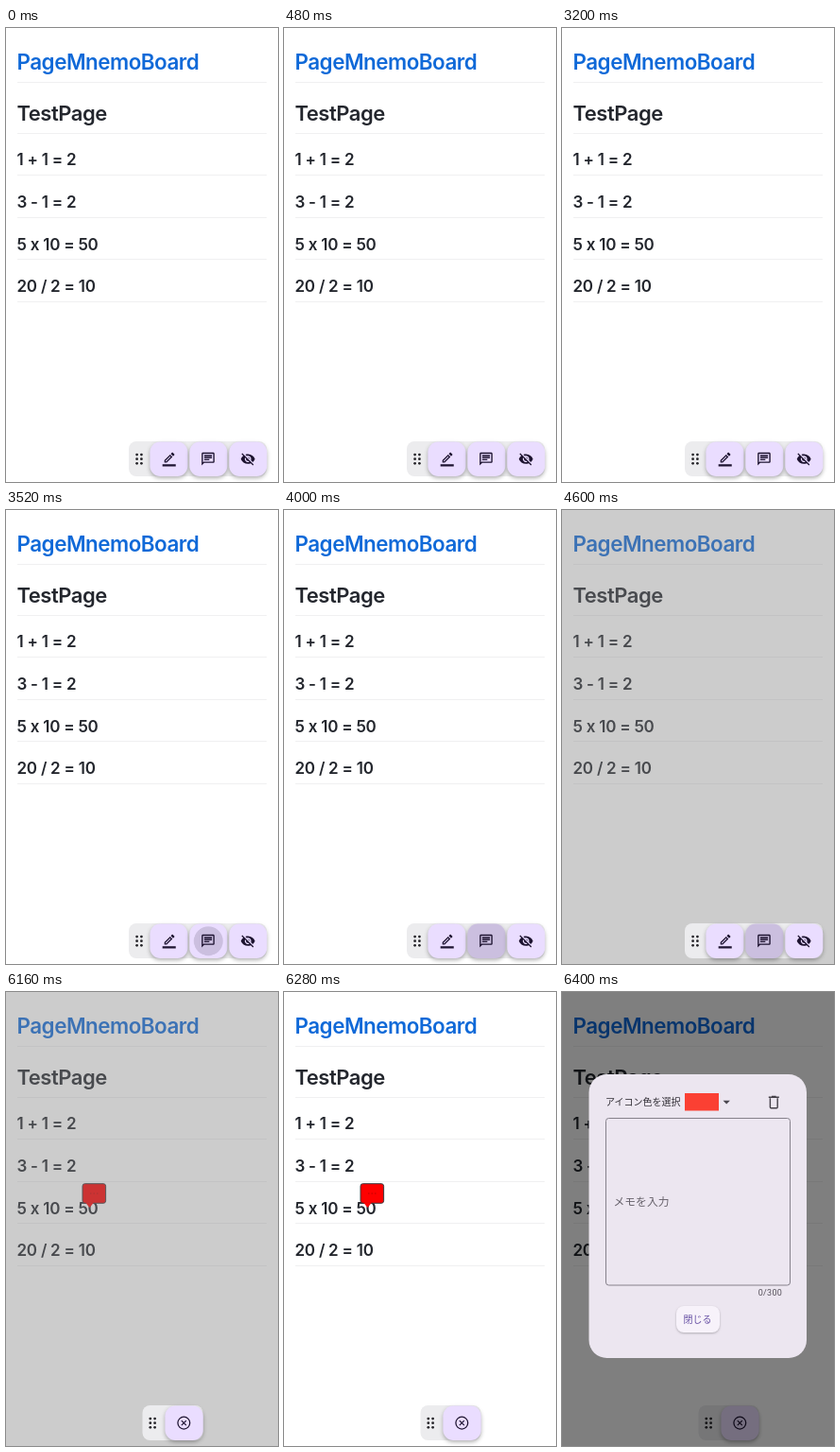
An HTML page for the animation above (8000 ms loop, 288 by 480 pixels).

```html
<!DOCTYPE html>
<html lang="ja">
<head>
<meta charset="utf-8">
<title>Memo page</title>
<style>
  html, body { margin: 0; width: 100%; height: 100%; overflow: hidden; background: #fff; }
  svg { display: block; width: 100%; height: 100%; }

  .page { font-family: Inter, sans-serif; font-weight: 600; fill: #23262d; }
  .head { font-size: 22px; letter-spacing: -.022em; }
  .link { font-size: 22.4px; fill: #0f69d8; }
  .sum { font-size: 17px; letter-spacing: -.014em; }
  .rule { fill: #f0f0f1; }

  .panel { fill: #ececee; }
  .btn { fill: #eaddff; filter: drop-shadow(0 2px 2px rgba(0, 0, 0, .3)); }
  .ink { fill: #1d1330; }
  .dots { fill: #27262b; }
  .line { fill: none; stroke: #1d1330; stroke-width: 1.25; }

  .jp { font-family: "Noto Sans CJK JP", "Noto Sans CJK", sans-serif; }
  .card { fill: #ece6f0; }
  .field { fill: none; stroke: #86818b; }

  /* Timeline: 1% = 80ms */
  .veil, .pin, .tools, .cancel, .dialog { animation: 8s step-end infinite; }
  .veil { animation-name: veil; }
  .pin, .cancel { animation-name: placed; }
  .tools { animation-name: tools; }
  .dialog { animation-name: dialog; }
  .ripple {
    fill: #1d192b;
    transform-box: fill-box;
    transform-origin: center;
    animation: ripple 8s linear infinite;
  }
  @keyframes veil { 0% { opacity: 0 } 57.5% { opacity: 1 } 78.5%, 100% { opacity: 0 } }
  @keyframes placed { 0% { opacity: 0 } 77%, 100% { opacity: 1 } }
  @keyframes tools { 0% { opacity: 1 } 77%, 100% { opacity: 0 } }
  @keyframes dialog { 0% { opacity: 0 } 80%, 100% { opacity: 1 } }
  @keyframes ripple {
    0%, 40% { opacity: 0; transform: scale(.25) }
    43% { opacity: .15 }
    50%, 100% { opacity: .15; transform: scale(1) }
  }
</style>
</head>
<body>
<svg viewBox="0 0 288 480">
  <defs>
    <clipPath id="key"><rect x="194.3" y="437.5" width="40" height="36.5" rx="11"/></clipPath>
    <g id="grip" class="dots">
      <circle cx="-2.4" cy="-4.6" r="1.4"/><circle cx="2.4" cy="-4.6" r="1.4"/>
      <circle cx="-2.4" r="1.4"/><circle cx="2.4" r="1.4"/>
      <circle cx="-2.4" cy="4.6" r="1.4"/><circle cx="2.4" cy="4.6" r="1.4"/>
    </g>
  </defs>
  <rect width="288" height="480" fill="#fff"/>

  <g class="page">
    <text class="head link" x="11.5" y="44">PageMnemoBoard</text>
    <text class="head" x="11.5" y="97.5">TestPage</text>
    <text class="sum" x="11.5" y="145.3">1 + 1 = 2</text>
    <text class="sum" x="11.5" y="190">3 - 1 = 2</text>
    <text class="sum" x="11.5" y="234.6">5 x 10 = 50</text>
    <text class="sum" x="11.5" y="279.2">20 / 2 = 10</text>
  </g>
  <g class="rule">
    <rect x="12" y="57" width="264" height="1"/>
    <rect x="12" y="111" width="264" height="1"/>
    <rect x="12" y="155" width="264" height="1"/>
    <rect x="12" y="200" width="264" height="1"/>
    <rect x="12" y="244" width="264" height="1"/>
    <rect x="12" y="289" width="264" height="1"/>
  </g>

  <g class="pin">
    <rect x="81" y="202.7" width="24.6" height="20.6" rx="2.5" fill="#f00" stroke="#3c3c40"/>
    <path d="M84 222.5L88.5 228L93 222.5Z" fill="#f00"/>
    <path d="M89 213h1.5m2 0h1.5m2 0h1.5" stroke="#c00000" stroke-width="1.2"/>
  </g>

  <rect class="veil" width="288" height="480" fill="rgb(128,128,128)" fill-opacity=".4"/>

  <g class="tools">
    <rect class="panel" x="130" y="437" width="146" height="37" rx="8"/>
    <use href="#grip" x="141" y="455.7"/>
    <rect class="btn" x="152.4" y="437.5" width="40" height="36.5" rx="11"/>
    <rect class="btn" x="194.3" y="437.5" width="40" height="36.5" rx="11"/>
    <rect class="btn" x="236.3" y="437.5" width="40" height="36.5" rx="11"/>
    <g clip-path="url(#key)"><circle class="ripple" cx="214.3" cy="455.7" r="28"/></g>
    <g class="ink">
      <path transform="translate(165 447.5) scale(.67)" d="M16.81 8.94l-3.75-3.75L4 14.25V18h3.75l9.06-9.06zM6 16v-.92l7.06-7.06.92.92L6.92 16H6zM19.71 6.04c.39-.39.39-1.02 0-1.41l-2.34-2.34c-.4-.4-1-.4-1.41 0l-1.83 1.83 3.75 3.75zM1 20.5h21v3.5H1z"/>
      <path transform="translate(205.8 447.5) scale(.68)" d="M4 4h16v12H5.17L4 17.17V4m0-2c-1.1 0-2 .9-2 2v18l4-4h14c1.1 0 2-.9 2-2V4c0-1.1-.9-2-2-2H4zm2 10h8v2H6zm0-3h12v2H6zm0-3h12v2H6z"/>
      <path transform="translate(248 447.5) scale(.68)" d="M12 7c2.76 0 5 2.24 5 5 0 .65-.13 1.26-.36 1.83l2.92 2.92c1.51-1.26 2.7-2.89 3.43-4.75-1.73-4.39-6-7.5-11-7.5-1.4 0-2.74.25-3.98.7l2.16 2.16C10.74 7.13 11.35 7 12 7zM2 4.27l2.74 2.74C3.08 8.3 1.78 10.02 1 12c1.73 4.39 6 7.5 11 7.5 1.55 0 3.03-.3 4.38-.84L19.73 22 21 20.73 3.27 3 2 4.27zM7.53 9.8l1.55 1.55C8.6 13.4 10.2 15.5 12.65 14.92l1.55 1.55C10.4 18.3 5.7 14.2 7.53 9.8zm4.31-.78l3.15 3.15c.1-1.8-1.3-3.2-3.15-3.15z"/>
    </g>
  </g>

  <g class="cancel">
    <rect class="panel" x="144.5" y="437" width="64" height="37" rx="8"/>
    <use href="#grip" x="155.2" y="455.7"/>
    <rect class="btn" x="168.4" y="437.5" width="40.3" height="36.5" rx="11"/>
    <circle class="line" cx="188.3" cy="455.6" r="6.4"/>
    <path class="line" d="M185.8 453.1l5 5m0-5l-5 5"/>
  </g>

  <g class="dialog">
    <rect width="288" height="480" fill="#000" fill-opacity=".5"/>
    <rect class="card" x="28.5" y="87" width="230.5" height="300" rx="19"/>
    <text class="jp" x="46" y="120" font-size="10" fill="#302d34">アイコン色を選択</text>
    <rect x="130" y="107" width="36" height="18.5" fill="#fb4033"/>
    <path d="M170.5 114.7h7.4l-3.7 3.8z" fill="#4a464e"/>
    <path fill="none" stroke="#454149" stroke-width="1.4" d="M220.4 112.3v9.4q0 1 1 1h5.8q1 0 1-1v-9.4M218.8 111.3h11M222 110.4h4.6"/>
    <rect class="field" x="46.5" y="133.5" width="195" height="176.5" rx="3"/>
    <text class="jp" x="54.5" y="226" font-size="11.8" fill="#68636c">メモを入力</text>
    <text x="233" y="321" text-anchor="end" font-family="Roboto, sans-serif" font-size="9" letter-spacing=".25" fill="#55505a">0/300</text>
    <rect x="121" y="332" width="46" height="28" rx="8" fill="#f7f2fa" style="filter:drop-shadow(0 1px 1px rgba(0,0,0,.25))"/>
    <text class="jp" x="143.5" y="349.6" text-anchor="middle" font-size="10" font-weight="500" fill="#6750a4">閉じる</text>
  </g>
</svg>
</body>
</html>
```
